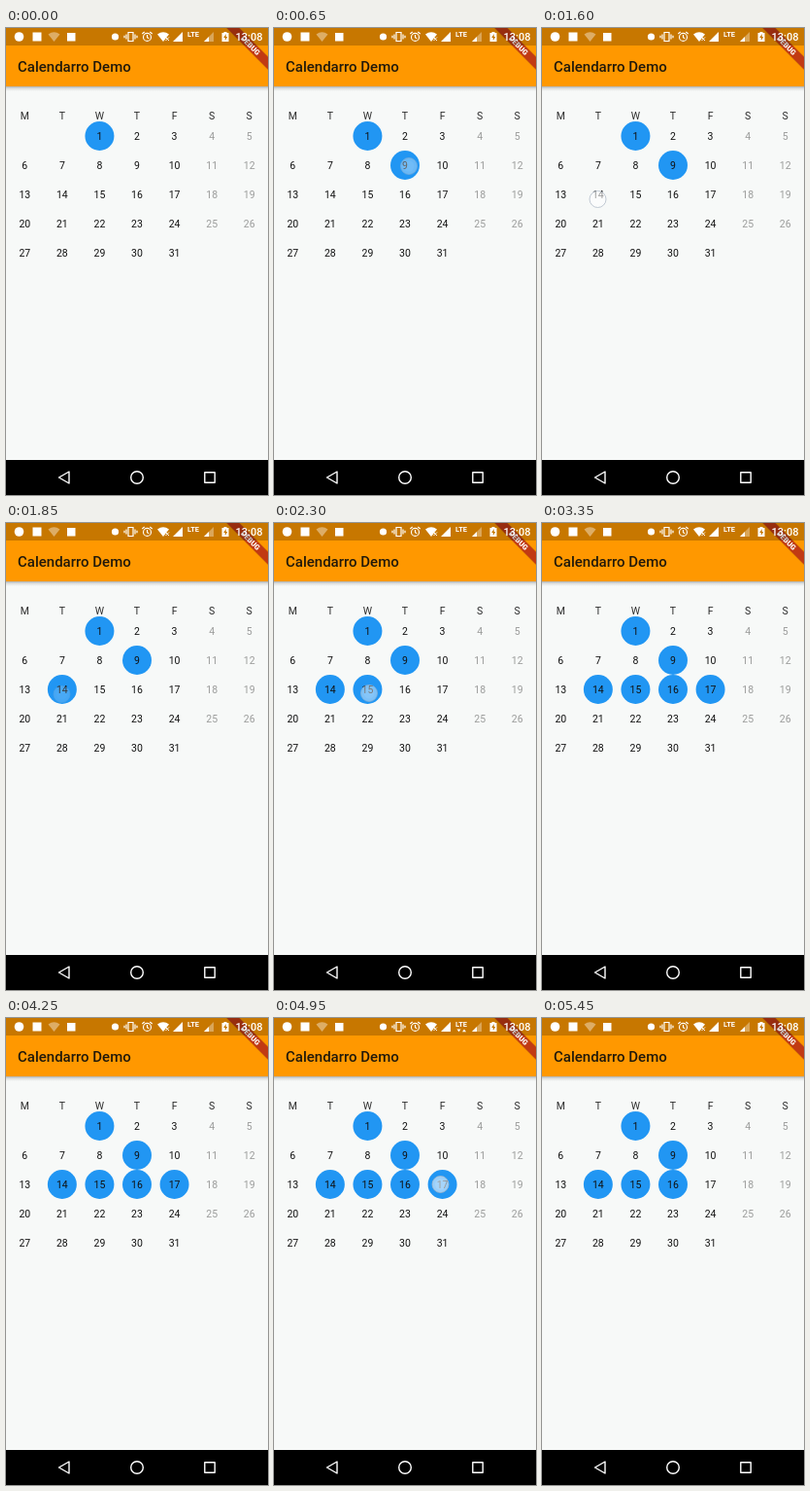
Write an HTML page that moves like this. It is 270 px wide and 480 px high and loops after 5.7 s.

```html
<!DOCTYPE html>
<html lang="en">
<head>
<meta charset="utf-8">
<title>Calendar</title>
<style>
  html, body { margin: 0; width: 100%; height: 100%; overflow: hidden; background: #f7f9f8; }
  svg { display: block; width: 100%; height: 100%; }
  text { font-family: Roboto, "Open Sans", sans-serif; }
  .day { font-size: 10.5px; text-anchor: middle; fill: #111; }
  .head { fill: #2c2c2c; }
  .off { fill: #9b9c9b; }
  .title { font-size: 15px; font-weight: 500; fill: #21190a; }
  .line { fill: none; stroke: #fff; }
</style>
</head>
<body>
<svg viewBox="0 0 270 480">
  <defs>
    <linearGradient id="shade" x2="0" y2="1">
      <stop offset="0" stop-opacity=".3"/>
      <stop offset=".4" stop-opacity=".11"/>
      <stop offset="1" stop-opacity="0"/>
    </linearGradient>
  </defs>
  <rect width="270" height="480" fill="#f7f9f8"/>
  <g id="marks" fill="#2196f3"></g>
  <g id="days"></g>
  <g id="touch">
    <circle r="8.5" fill="#fff" fill-opacity=".55" stroke="#aeb8c6" stroke-opacity=".75"/>
    <circle r="5.5" fill="#fff" fill-opacity=".12"/>
  </g>

  <rect y="60" width="270" height="5" fill="url(#shade)"/>
  <rect width="270" height="60" fill="#ff9800"/>
  <text class="title" x="12" y="44.8">Calendarro Demo</text>

  <g transform="translate(270 0) rotate(45)">
    <rect x="-32" y="20.5" width="64" height="10" fill="#000" opacity=".14"/>
    <rect x="-30" y="21" width="60" height="9" fill="#b71c1c" opacity=".7"/>
    <text y="28.2" text-anchor="middle" font-size="7.6" font-weight="900" fill="#fff">DEBUG</text>
  </g>

  <!-- status bar -->
  <rect width="270" height="18" opacity=".22"/>
  <g fill="#fff">
    <circle cx="13.5" cy="9" r="4.8"/>
    <rect x="27.5" y="4.5" width="9" height="9"/>
    <path d="M43.5 6.5Q49.5 2 55.5 6.5L49.5 14Z" opacity=".4"/>
    <rect x="63" y="5" width="8.5" height="8.5"/>
    <circle cx="112.5" cy="9" r="3.6"/>
    <path class="line" d="M126 4.5h5v9h-5zM124 6.5v5M133 6.5v5M122 7.7v2.6M135 7.7v2.6" stroke-width="1.2"/>
    <g class="line" stroke-width="1.1">
      <circle cx="145.5" cy="9.4" r="4"/>
      <path d="M145.5 7v2.8l1.8 1M140.3 6l2.4-2M150.7 6l-2.4-2"/>
    </g>
    <path d="M156 6.5Q162 2 168 6.5L162 14Z"/>
    <path d="M164.5 9.5l3.5 3.5M168 9.5l-3.5 3.5" stroke="#fff"/>
    <path d="M172 14L182 4V14Z"/>
    <text x="193" y="9.3" text-anchor="middle" font-size="7.4" font-weight="700">LTE</text>
    <path id="data" d="M188.5 11.5h4l-2 2.8zM194 14.3h4l-2-2.8z"/>
    <path d="M204 14L214 4V14Z" opacity=".35"/>
    <path d="M204 14L209 9V14Z"/>
    <path d="M222.5 5h2V4h3v1h2v9h-7z"/>
    <path d="M226.7 6l-2.5 4h1.6v3l2.4-4h-1.5z" fill="#c77700"/>
    <text x="250.5" y="13" text-anchor="middle" font-size="11" font-weight="500">13:08</text>
  </g>

  <!-- navigation bar -->
  <rect y="444" width="270" height="36"/>
  <g class="line" stroke-width="1.4" stroke-linejoin="round">
    <path d="M54.5 462L65 456V468Z"/>
    <circle cx="135" cy="462" r="6.3"/>
    <rect x="204.8" y="456.8" width="10.4" height="10.4"/>
  </g>
</svg>
<script>
const LOOP = 5700, FADE = 250;
const $ = id => document.getElementById(id);
const colX = c => 270 / 7 * (c + .5);

// day, touch point, press time, release time
const taps = [
  { day: 9,  x: 139, y: 142, down: 450,  up: 600 },
  { day: 14, x: 57.5, y: 176, down: 1600, up: 1700 },
  { day: 15, x: 98,  y: 175, down: 2200, up: 2300 },
  { day: 16, x: 139, y: 170, down: 2550, up: 2600 },
  { day: 17, x: 173, y: 175, down: 3000, up: 3100 },
  { day: 17, x: 171.5, y: 171, down: 4950, up: 5050 }
];
const dataBursts = [[4150, 4250], [4950, 5300]];

function add(parent, tag, attrs, text = "") {
  const el = document.createElementNS("http://www.w3.org/2000/svg", tag);
  for (const key in attrs) el.setAttribute(key, attrs[key]);
  el.textContent = text;
  return parent.appendChild(el);
}

const dayPos = day => {
  const i = day + 1;
  return { c: i % 7, y: 111 + 30 * Math.floor(i / 7) };
};

[..."MTWTFSS"].forEach((name, c) =>
  add($("days"), "text", { class: "day head", x: colX(c), y: 93.8 }, name));

const marks = {};
for (let day = 1; day <= 31; day++) {
  let { c, y } = dayPos(day);
  if (day < 6) { c = day + 1; y = 111; }
  add($("days"), "text", { class: c > 4 ? "day off" : "day", x: colX(c), y: y + 3.8 }, day);
  if (day === 1 || taps.some(t => t.day === day))
    marks[day] = add($("marks"), "circle", { cx: colX(c), cy: y, r: 15 });
}

function draw(t) {
  for (const day in marks) {
    const count = taps.filter(p => p.day === +day && t >= p.up).length;
    marks[day].style.display = +day === 1 || count % 2 ? "" : "none";
  }
  const tap = taps.find(p => t >= p.down && t < p.up + FADE);
  const touch = $("touch");
  touch.style.display = tap ? "" : "none";
  if (tap) {
    touch.setAttribute("transform", `translate(${tap.x} ${tap.y})`);
    touch.style.opacity = t < tap.up ? 1 : .75 * (1 - (t - tap.up) / FADE);
  }
  const busy = dataBursts.some(([a, b]) => t >= a && t < b);
  $("data").style.display = busy ? "" : "none";
}

const start = performance.now();
function tick() {
  draw((performance.now() - start) % LOOP);
  requestAnimationFrame(tick);
}
draw(0);
requestAnimationFrame(tick);
</script>
</body>
</html>
```
